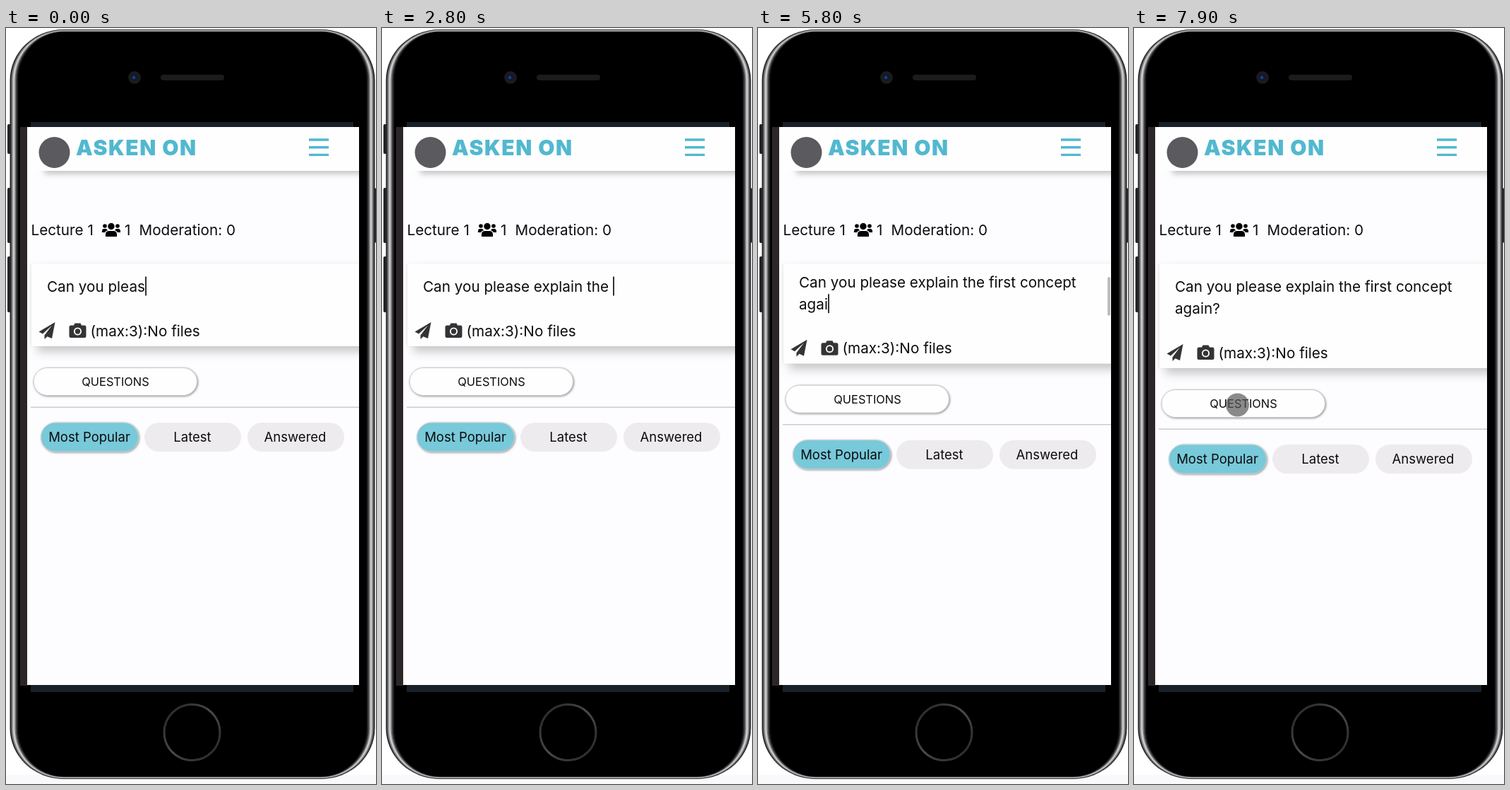
Write an HTML page that moves like this. It is 524x1069 px and loops after 8 s.

```html
<!DOCTYPE html>
<html lang="en">
<head>
<meta charset="utf-8">
<title>Asking a question</title>
<style>
  html, body { margin: 0; width: 100%; height: 100%; overflow: hidden; background: #fff; }
  svg { display: block; width: 100%; height: 100%; }
  text { font: 20.7px Inter, sans-serif; font-optical-sizing: none; fill: #0c0c0e; white-space: pre; }
  .brand { font-weight: 900; font-size: 30px; letter-spacing: 1.5px; fill: #52b8cf; }
  .pill { font-size: 18.5px; text-anchor: middle; }
  .small { font-size: 16.4px; text-anchor: middle; }
  .header { filter: drop-shadow(8px 4px 4px rgba(0, 0, 0, .24)); }
  .card { filter: drop-shadow(8px 8px 7px rgba(0, 0, 0, .2)) drop-shadow(-1px 0 1px rgba(0, 0, 0, .08)); }
  .raised { filter: drop-shadow(1.5px 1.5px 1.5px rgba(0, 0, 0, .42)); }
  .icon { fill: #343437; }
</style>
</head>
<body>
<svg viewBox="0 0 524 1069" preserveAspectRatio="none">
  <defs>
    <linearGradient id="ring" x1="0" y1="0" x2="1" y2="1">
      <stop offset="0" stop-color="#252525"/>
      <stop offset=".5" stop-color="#4a4a4a"/>
      <stop offset="1" stop-color="#242424"/>
    </linearGradient>
    <clipPath id="screen"><rect x="30" y="140" width="470" height="789"/></clipPath>
    <clipPath id="field"><rect id="fieldArea" x="50" y="340" width="450" height="55"/></clipPath>
  </defs>

  <!-- Phone body -->
  <rect y="1056" width="524" height="13" fill="#f9f9fb"/>
  <g fill="#242426">
    <rect x="2" y="136" width="8" height="42" rx="2"/>
    <rect x="2" y="226" width="8" height="78" rx="2"/>
    <rect x="2" y="323" width="8" height="79" rx="2"/>
    <rect x="517" y="226" width="7" height="78" rx="2"/>
  </g>
  <rect x="5.5" y="2" width="517" height="1060" rx="76" ry="72" fill="#29292b"/>
  <rect x="7.5" y="2.8" width="513" height="1058.4" rx="74" ry="71" fill="#77777a"/>
  <rect x="9.5" y="3.6" width="509" height="1056.8" rx="72" ry="70" fill="#c9c9cb"/>
  <rect x="12.5" y="4.4" width="503" height="1055.2" rx="69" ry="69" fill="#737375"/>
  <rect x="14.5" y="5" width="499" height="1054" rx="67" ry="68" fill="#262628"/>
  <rect x="17" y="5.6" width="494" height="1052.8" rx="65" ry="67"/>
  <rect x="35" y="133" width="457" height="8" fill="#1a2028"/>
  <rect x="35" y="928" width="457" height="11" fill="#1a2028"/>
  <rect x="20" y="140" width="11" height="790" fill="#2b2728"/>
  <circle cx="182" cy="70" r="9" fill="#1b1b1e"/>
  <circle cx="182" cy="70" r="5" fill="#101b35"/>
  <circle cx="181" cy="70" r="2" fill="#21468a"/>
  <rect x="219" y="66" width="90" height="8" rx="4" fill="#1d1b1c"/>
  <circle cx="263.5" cy="996" r="39.5" fill="none" stroke="url(#ring)" stroke-width="3"/>

  <g clip-path="url(#screen)">
    <rect x="30" y="140" width="470" height="789" fill="#fdfcfe"/>
    <rect class="header" x="46" y="130" width="480" height="72" fill="#fefefe"/>
    <rect x="30" y="140" width="470" height="62" fill="#fefefe"/>
    <circle cx="68.5" cy="176" r="22" fill="#5a5a5f"/>
    <text class="brand" x="99" y="180">ASKEN ON</text>
    <path d="M429 158h28M429 168.7h28M429 179.4h28" stroke="#52b8cf" stroke-width="3.4"/>

    <text x="35.5" y="293">Lecture 1</text>
    <g>
      <circle cx="149" cy="280.5" r="4.7"/>
      <circle cx="140" cy="280" r="2.8"/>
      <circle cx="158" cy="280" r="2.8"/>
      <path d="M141 295v-3q0-5 5-5h6q5 0 5 5v3z"/>
      <path d="M136 289v-2q0-3 3-3h3l2 2q-3 1-4 3zM162 289v-2q0-3-3-3h-3l-2 2q3 1 4 3z"/>
    </g>
    <text x="168" y="293">1</text>
    <text x="188.5" y="293">Moderation: 0</text>

    <rect class="card" id="card" x="36" y="333" width="490" height="117" fill="#fefefe"/>
    <g clip-path="url(#field)">
      <g id="entry">
        <text id="line1" x="58" y="373" xml:space="preserve"></text>
        <text id="line2" x="58" y="404" xml:space="preserve"></text>
        <rect id="caret" width="1.6" height="27"/>
      </g>
    </g>
    <rect id="scrollbar" x="495" y="352" width="4" height="54" rx="2" fill="#bcbcbe"/>

    <g id="below">
      <path class="icon" d="M69.5 416L46.5 429.5l5.5 3L65 420.5 54.5 434.5v5.5l4-3.8 6.5 2.8z"/>
      <path class="icon" fill-rule="evenodd" d="M92 420.5h4l1.5-3h8l1.5 3h4q2.5 0 2.5 2.5v12.500q0 2.500-2.500 2.500h-19q-2.500 0-2.500-2.500v-12.500q0-2.500 2.500-2.500zM101.500 423.500a5.500 5.500 0 1 0 .01 0z"/>
      <circle class="icon" cx="101.500" cy="429" r="3.700"/>
      <text x="119.500" y="435.500">(max:3):No files</text>

      <rect class="raised" x="39" y="480.500" width="231.500" height="39" rx="19.500" fill="#fefefe" stroke="#c9c9cb"/>
      <text class="small" x="155" y="506">QUESTIONS</text>
      <path d="M35 536.200h465" stroke="#cbcbcd" stroke-width="1.500"/>

      <rect class="raised" x="49.500" y="558" width="138" height="41" rx="20.500" fill="#78c9d9" stroke="#c6d3d5"/>
      <rect x="196" y="558" width="137" height="41" rx="20.500" fill="#eeebee"/>
      <rect x="342" y="558" width="137" height="41" rx="20.500" fill="#eeebee"/>
      <text class="pill" x="118" y="585">Most Popular</text>
      <text class="pill" x="264" y="585">Latest</text>
      <text class="pill" x="409.500" y="585">Answered</text>
    </g>
    <circle id="pointer" r="16.500" fill="#555" fill-opacity=".68"/>
  </g>
</svg>
<script>
  const LOOP = 8000;
  const MESSAGE = "Can you please explain the first concept again?";
  const BREAK = MESSAGE.indexOf("again");
  const LINE_HEIGHT = 31;
  const TYPING_END = 6300;
  // [time, characters typed]
  const TYPING = [[0, 13], [1900, 22], [3900, 34], [5300, 41], [5400, 42], [5800, 45], [TYPING_END, 47]];

  const $ = id => document.getElementById(id);
  const clamp = v => Math.max(0, Math.min(1, v));
  const progress = (t, start, duration) => clamp((t - start) / duration);
  const easeOut = p => 1 - (1 - p) ** 2;
  const easeInOut = p => p * p * (3 - 2 * p);
  const set = (id, attributes) => {
    for (const [name, value] of Object.entries(attributes)) $(id).setAttribute(name, value);
  };
  const show = (id, visible) => set(id, { visibility: visible ? "visible" : "hidden" });

  function typedCount(t) {
    const next = TYPING.findIndex(([time]) => time > t);
    if (next < 0) return MESSAGE.length;
    const [t0, n0] = TYPING[next - 1], [t1, n1] = TYPING[next];
    return Math.floor(n0 + (n1 - n0) * (t - t0) / (t1 - t0) + 0.3);
  }

  function drawEntry(t, growth) {
    const count = typedCount(t);
    const wrapped = count > BREAK + 1;
    const typed = MESSAGE.slice(0, count);
    $("line1").textContent = wrapped ? typed.slice(0, BREAK) : typed;
    $("line2").textContent = wrapped ? typed.slice(BREAK) : "";
    const line = $(wrapped ? "line2" : "line1");
    set("caret", {
      x: 58.3 + line.getComputedTextLength(),
      y: wrapped ? 351.5 + LINE_HEIGHT : 351.5
    });
    show("caret", t < TYPING_END || (t - TYPING_END) % 1000 < 500);
    // The growing field stays scrolled to its last line.
    set("entry", { transform: `translate(0 ${wrapped ? growth - LINE_HEIGHT : 0})` });
  }

  function draw(t) {
    const growth = LINE_HEIGHT * easeOut(progress(t, 5500, 550));
    drawEntry(t, growth);
    set("card", { height: 117 + growth });
    set("fieldArea", { height: 55 + growth });
    set("below", { transform: `translate(0 ${growth})` });
    set("scrollbar", { height: 30 + growth });
    show("scrollbar", growth > 0 && growth < LINE_HEIGHT);

    const move = easeInOut(progress(t, 6900, 800));
    set("pointer", { cx: 150.5 - 4 * move, cy: 356 + 177 * move });
    show("pointer", t >= 6700);
  }

  const start = performance.now();
  function frame() {
    draw((performance.now() - start) % LOOP);
    requestAnimationFrame(frame);
  }
  frame();
</script>
</body>
</html>
```
